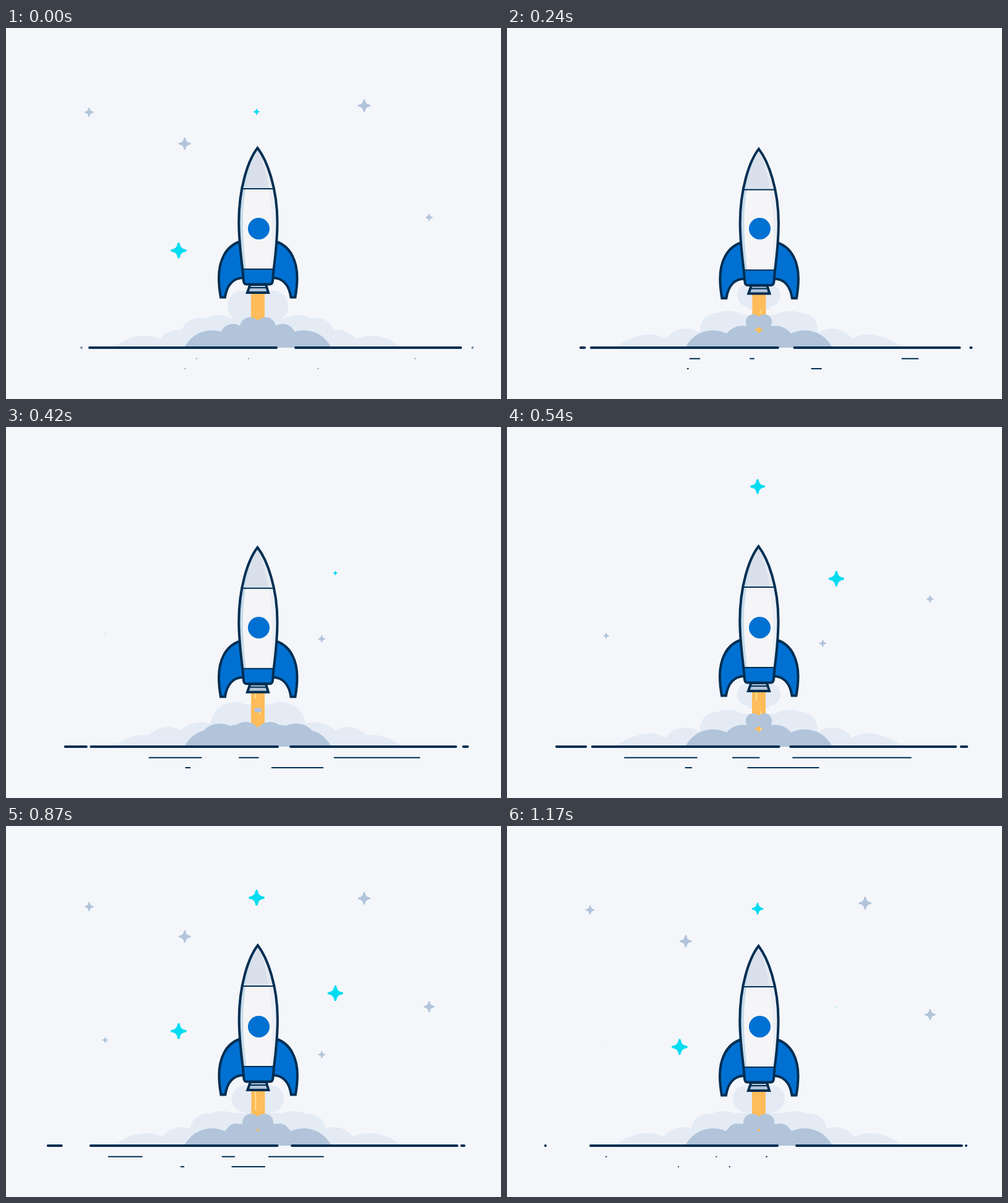
These frames come from a looping animation (800 px wide and 600 px high, 1.2 s). An HTML page with a canvas:

```html
<!DOCTYPE html>
<html lang="en">
<head>
<meta charset="utf-8">
<title>Rocket launch</title>
<style>
  html, body { margin: 0; width: 100%; height: 100%; overflow: hidden; background: #f4f6fa; }
  canvas { display: block; }
</style>
</head>
<body>
<canvas id="stage" width="800" height="600"></canvas>
<script>
const ctx = document.getElementById('stage').getContext('2d');
const LOOP = 1200, STEP = 30, MID = 407, GROUND = 517;
const NAVY = '#002e52', BLUE = '#0071d2', HAZE = '#e4ebf5', STEEL = '#b1c4da', CYAN = '#00dcf0';

const clamp = (v, lo = 0, hi = 1) => Math.min(hi, Math.max(lo, v));
const mix = (a, b, u) => a + (b - a) * u;
const sineEase = u => (1 - Math.cos(Math.PI * clamp(u))) / 2;
const cubicEase = u => u < 0.5 ? 4 * u ** 3 : 1 - 4 * (1 - clamp(u)) ** 3;

function shape(d, fill, stroke, width) {
  const path = new Path2D(d);
  if (fill) { ctx.fillStyle = fill; ctx.fill(path); }
  if (stroke) { ctx.strokeStyle = stroke; ctx.lineWidth = width; ctx.stroke(path); }
}

function rect(x, y, w, h, fill) {
  ctx.fillStyle = fill;
  ctx.fillRect(x, y, w, h);
}

function circle(x, y, r, fill) {
  ctx.fillStyle = fill;
  ctx.beginPath();
  ctx.arc(x, y, Math.max(0, r), 0, 7);
  ctx.fill();
}

function isolated(part) {
  ctx.save();
  part();
  ctx.restore();
}

// A puff and its mirror image
function puffs(x, y, r, fill) {
  circle(x, y, r, fill);
  circle(2 * MID - x, y, r, fill);
}

// Each puff takes over where the one outside it started, so q = 1 joins q = 0
function lightSmoke(q) {
  const settle = clamp(q / 0.4), x = 397 - 34 * q;
  puffs(223, 565, 67, HAZE);
  puffs(mix(236, 223, settle), mix(537, 565, settle), mix(44, 67, settle), HAZE);
  puffs(298 - 45 * q, 524 + 10 * q, 40, HAZE);
  puffs(364 - 128 * q, 475 + 62 * q, 22 + 22 * q, HAZE);
  puffs(371 - 70 * q, 498 + 33 * q, 47, HAZE);
  puffs(x, 415 + 87 * q, 11 + 36 * q, HAZE);
  rect(x, 408 + 51 * q, 2 * (MID - x), 25 + 60 * q, HAZE);
  rect(368, 464, 78, 50, HAZE);
  rect(300, 494, 214, 23, HAZE);
}

function darkSmoke(q) {
  const r = 6 + 37 * q, top = 476.5 + 60 * (q - 0.58) ** 2;
  const fresh = a => puffs(401.5 - 17.5 * a, 466.5 + 44 * a, 8 + 21 * a, STEEL);
  puffs(333, 539, 50, STEEL);
  puffs(388 - 53 * q, top + r, r, STEEL);
  puffs(383.5 - 12 * q, 512 + 15 * q, 30.5 + 15 * q, STEEL);
  fresh(q);
  fresh(q - 1);
  rect(335, 494, 144, 23, STEEL);
}

const star = (x, y, speed, radius, birth) => ({ x, y, speed, radius, birth });
const STARS = [
  star(134, 126, 0.0175, 7.5, 630),
  star(288.5, 171, 0.025, 10, 570),
  star(404.7, 91, 0.0595, 13, 456),
  star(578.5, 110.4, 0.026, 10.3, 630),
  star(683.5, 275.4, 0.0425, 9, 480),
  star(278.7, 305.7, 0.0855, 13, 570),
  star(160, 333.9, 0.0255, 4.8, 400),
  star(510, 336.1, 0.06, 6, 315),
  star(532, 234, 0.076, 12.7, 395)
];
const STAR = 'M0-.85Q.08-.08 .85 0Q.08 .08 0 .85Q-.08 .08-.85 0Q-.08-.08 0-.85Z';

function stars(t) {
  const life = 780, ramp = 90;
  for (const { x, y, speed, radius, birth } of STARS) {
    const age = (t - birth + LOOP) % LOOP;
    const size = radius * clamp(Math.min(age, life - age) / ramp);
    const color = radius > 12 ? CYAN : STEEL;
    if (size) isolated(() => {
      ctx.translate(x + 0.3, y + 0.3 + speed * age);
      ctx.scale(size, size);
      shape(STAR, color, color, 0.29);
    });
  }
}

function flame(t) {
  const streak = (x, y, h) => rect(x - 0.8, y, 1.6, Math.max(0, h), '#ffe9a0');
  shape('M396 426H418V488L407 495L396 488Z', '#ffbc5a');
  const top = Math.max(430, 430 + (t - 880) * 0.15);
  if (t > 270) streak(403, top, 417 + 0.05 * t - top);
  const length = clamp(Math.min(t - 60, 900 - t) / 35, 0, 6);
  streak(410, 449 + 0.0218 * t, length);
  streak(410, 468 + 0.032 * t, length);
}

const HULL = 'M406.500 194C391 214 376.300 259 376.300 314C376.300 342 380 372 382.500 392L384 409Q384.500 414.500 389 414.500H426Q430.500 414.500 431 409L432.500 392C435 372 438.500 342 438.500 314C438.500 259 422 214 406.500 194Z';
const FIN = 'M378 345.500C354 353 344 378 344 404C344 416 345.500 427 347 435.500H354C357 416 367 404 384 404Z';

function rocket() {
  shape(FIN, BLUE, NAVY, 4);
  isolated(() => {
    ctx.translate(2 * MID + 0.5, 0);
    ctx.scale(-1, 1);
    shape(FIN, BLUE, NAVY, 4);
  });
  shape('M394.500 415H420L424 428H390Z', STEEL, NAVY, 4);
  shape('M392 420H422', null, NAVY, 2);
  isolated(() => {
    ctx.clip(new Path2D(HULL));
    rect(370, 190, 75, 230, '#f5f5f7');
    rect(370, 190, 75, 70, '#d9e0eb');
    shape('M406 190C390 225 382 280 383 325C384 350 386 372 388 392H370V190Z', '#c8dcea');
    shape('M407 192C424 240 436 310 428 392H445V192Z', 'rgba(232,237,243,.75)');
    rect(370, 390, 75, 30, BLUE);
    shape('M370 260H445M370 390H445', null, NAVY, 2);
  });
  shape(HULL, null, NAVY, 4);
}

// Rocket offsets: time, x, y
const SHAKE = [[0, 0, 0], [120, 1, 1], [330, 0, 2], [540, 0, -1], [870, 0.4, -1], [LOOP, 0, 0]];

function shaken(t, part) {
  const i = SHAKE.findIndex(([time]) => time > t);
  const [t0, x0, y0] = SHAKE[i - 1], [t1, x1, y1] = SHAKE[i];
  const u = sineEase((t - t0) / (t1 - t0));
  isolated(() => {
    ctx.translate(mix(x0, x1, u), mix(y0, y1, u));
    part(t);
  });
}

function bar(left, right, y, width) {
  shape(`M${left + width / 2} ${y}H${Math.max(right - width / 2, left + width / 2 + 0.01)}`, null, NAVY, width);
}

function ground(t) {
  const sway = sineEase(1 - Math.abs(1 - 2 * t / LOOP));
  const head = cubicEase(t / 800), tail = sineEase((t - 400) / 800);
  // A dot that stretches left over its length, then is pulled in by its tail
  const dash = (x, y, length, drift, width) =>
    bar(x - width / 2 - length * head + drift * sway, x + width / 2 - length * tail + drift * sway, y, width);

  bar(133 + 3 * sway, 439 + 2.5 * sway, GROUND, 4);
  bar(466 - 10 * sway, 737 - 10 * sway, GROUND, 4);
  ctx.globalAlpha = t < STEP ? 0.5 : 1;
  dash(122, GROUND, 60, 10, 4);
  dash(754, GROUND, 12, -10, 4);
  dash(308, 534.7, 148, 10, 2);
  dash(392, 534.7, 54, 20, 2);
  dash(661, 534.7, 242, 10, 2);
  dash(289.5, 551, 12.5, 10, 2);
  dash(504.5, 551, 145, 10, 2);
  ctx.globalAlpha = 1;
}

function draw(t) {
  const q = ((t + 120) % 300) / 300;
  const aboveGround = smoke => isolated(() => {
    ctx.beginPath();
    ctx.rect(0, 0, 800, GROUND);
    ctx.clip();
    smoke(q);
  });
  rect(0, 0, 800, 600, '#f4f6fa');
  ctx.lineCap = ctx.lineJoin = 'round';
  stars(t);
  ctx.lineJoin = 'miter';
  aboveGround(lightSmoke);
  shaken(t, flame);
  aboveGround(darkSmoke);
  shaken(t, rocket);
  circle(408.5, 324.5, 17.5, BLUE);
  ground(t);
}

const start = performance.now();
function frame() {
  const elapsed = (performance.now() - start) % LOOP;
  draw(Math.floor(elapsed / STEP) * STEP);
  requestAnimationFrame(frame);
}
frame();
</script>
</body>
</html>
```
